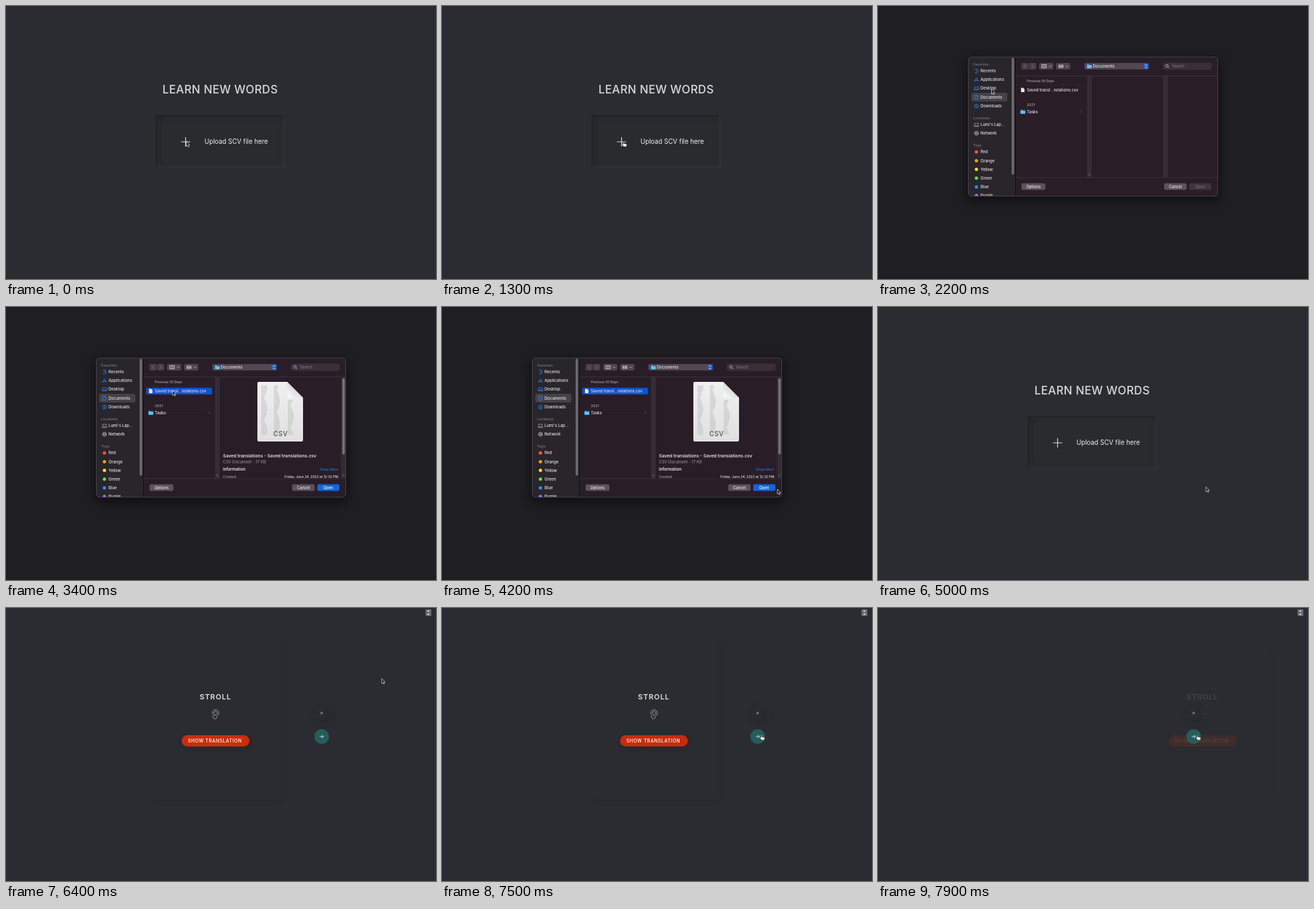
Write an HTML page that moves like this. It is 650 px wide and 412 px high and loops after 8 s.

```html
<!DOCTYPE html>
<html lang="en">
<head>
<meta charset="utf-8">
<title>Word trainer</title>
<style>
html, body { margin: 0; width: 100%; height: 100%; overflow: hidden; background: #2b2c31; }
svg { display: block; width: 100vw; height: 100vh; }
text { font-family: Inter, "Open Sans", sans-serif; }
</style>
</head>
<body>
<svg id="stage" viewBox="0 0 650 412" preserveAspectRatio="xMidYMid meet">
  <defs>
    <filter id="soft" x="-30%" y="-30%" width="160%" height="160%"><feGaussianBlur stdDeviation="3"/></filter>
    <filter id="wide" x="-30%" y="-30%" width="160%" height="160%"><feGaussianBlur stdDeviation="8"/></filter>
    <clipPath id="uploadClip"><rect x="226" y="164" width="197" height="81" rx="4"/></clipPath>
    <clipPath id="dialogClip"><rect x="136.5" y="77" width="377" height="210" rx="5"/></clipPath>
    <clipPath id="previewClip"><rect x="323" y="106" width="190" height="152.5"/></clipPath>
    <linearGradient id="paper" x2="0" y2="1"><stop stop-color="#f0f0f0"/><stop offset="1" stop-color="#e0e0e0"/></linearGradient>
    <linearGradient id="fold" x2="1" y1="1" y2="0"><stop stop-color="#fff"/><stop offset=".6" stop-color="#d4d4d4"/></linearGradient>
  </defs>
  <rect width="650" height="412" fill="#2b2c31"/>

  <g id="home">
    <g clip-path="url(#uploadClip)">
      <rect x="226" y="164" width="197" height="81" fill="#292b2f"/>
      <path d="M226 245V164H423" fill="none" stroke="#212327" stroke-width="7" filter="url(#soft)"/>
      <path d="M226 245H423V164" fill="none" stroke="#303136" stroke-width="5" filter="url(#soft)"/>
    </g>
    <text x="236.5" y="132" font-size="17" font-weight="500" letter-spacing=".35" fill="#d9d9da">LEARN NEW WORDS</text>
    <path d="M264.5 205H278.5M271.5 198V212" stroke="#dcdcdc" stroke-width="1.2"/>
    <text x="300" y="208" font-size="9.75" fill="#f0f0f0">Upload SCV file here</text>
  </g>

  <g id="trainer">
    <g id="card">
      <rect x="224" y="53" width="195" height="239" rx="8" fill="#25262a" opacity=".65" filter="url(#soft)"/>
      <rect x="218" y="46" width="198" height="243" rx="6" fill="#2b2c31"/>
      <text x="292.7" y="138" font-size="11" font-weight="600" letter-spacing=".9" fill="#e4e4e5">STROLL</text>
      <path d="M312.2 160C310.8 151.6 321.8 152 321.8 158.6C321.8 162 318.5 162.2 318.3 165.2C317.8 168.3 313.2 168 313 164.4L312.7 161.5M314.2 159.4C314 154.9 319.6 155 319.5 158.8C319.2 161 317.2 160.2 316.8 162.5M314.3 160.3C316.4 159.5 316.4 162 314.8 163" fill="none" stroke="#b9b9bb" stroke-width=".8"/>
      <rect x="266" y="194" width="102" height="17" rx="8.5" fill="#1b1b1e" opacity=".45" filter="url(#soft)"/>
      <rect x="265.5" y="192" width="102.5" height="17" rx="8.5" fill="#cb2d0b"/>
      <text x="275" y="203" font-size="6.9" font-weight="600" letter-spacing=".55" fill="#fbeae6">SHOW TRANSLATION</text>
    </g>
    <circle cx="480" cy="162" r="13" fill="#232529" opacity=".55" filter="url(#soft)"/>
    <circle cx="477" cy="158.5" r="10.5" fill="#2a2b30"/>
    <path d="M475.4 156.9l3.4 3.4m0-3.4l-3.4 3.4" stroke="#ccc" stroke-width=".8"/>
    <circle cx="477.2" cy="194" r="11" fill="#245e5b"/>
    <path d="M474.3 194h5.6m-2.4-2.4l2.4 2.4l-2.4 2.4" fill="none" stroke="#e6eeee" stroke-width=".9"/>
    <rect x="634" y="2" width="9" height="10" rx="1" fill="#66676b"/>
    <path d="M636 3.8h5l-2.5 2.5zM636 10.2h5l-2.5-2.5z" fill="#d8d8d8"/>
  </g>

  <rect id="shade" width="650" height="412" fill="#000"/>
  <g id="dialog"></g>
  <path id="arrow" d="M0 0V7.2L1.7 5.7L2.8 8.2L4 7.7L2.9 5.3H5.1Z" fill="#111" stroke="#eee" stroke-width=".7"/>
  <path id="hand" d="M1 0C1.8-.4 2.3.2 2.3 1V3.2C3 2.5 3.9 2.8 4 3.5C4.8 3 5.5 3.5 5.6 4C6.5 3.8 7 4.3 6.9 5.2L6.3 7.8H2.4L-.4 4.9C-.7 4 .3 3.7 1 4.5Z" fill="#f4f4f4" stroke="#222" stroke-width=".5"/>
</svg>
<script>
const LOOP = 8000;
const BLUE = '#2687f5';
const $ = id => document.getElementById(id);

const text = (x, y, s, size = 6, fill = '#e9e5e9', weight = 500, anchor = 'start') =>
  `<text x="${x}" y="${y}" font-size="${size}" fill="${fill}" font-weight="${weight}" text-anchor="${anchor}">${s}</text>`;
const rect = (x, y, w, h, fill, r = 0, more = '') =>
  `<rect x="${x}" y="${y}" width="${w}" height="${h}" rx="${r}" fill="${fill}" ${more}/>`;
const line = (d, stroke, width = .8) =>
  `<path d="${d}" fill="none" stroke="${stroke}" stroke-width="${width}"/>`;
const folder = (x, y) =>
  `<path d="M${x} ${y}h2.6l.8 .9h3.6v5h-7z" fill="#3cb3ee"/>` + rect(x, y + 1.8, 7, 4.1, '#55c6fa', .5);
const sheet = (x, y) => `<path d="M${x} ${y}h3.2l2 2v4.6h-5.2z" fill="#e8e8e8"/>`;

function sidebar() {
  const places = [
    ['Recents', 98, 'M146 96.5a3.1 3.1 0 1 1 0 3.2M148.8 96v2.2h1.5'],
    ['Applications', 111, 'M146 114l2.8-5.5l2.8 5.5M145.5 112.3h6.8'],
    ['Desktop', 124.3, 'M145.7 122h6.6v4.6h-6.6zM145.7 125.2h6.6'],
    ['Documents', 137.5, 'M146.6 134.5h2.8l1.8 1.8v4.4h-4.6zM149.2 134.6v1.9h2'],
    ['Downloads', 151, 'M145.8 151a3.1 3.1 0 1 0 6.2 0a3.1 3.1 0 1 0 -6.2 0M148.9 149v3.4m-1.3-1.2l1.3 1.3l1.3-1.3'],
    ["Lumi's Lap...", 179, 'M146 177h5.6v3.8h-5.6zM144.6 181.8h8.4'],
    ['Network', 192, 'M145.8 192a3.1 3.1 0 1 0 6.2 0a3.1 3.1 0 1 0 -6.2 0M146 192h5.8M148.9 189v6M147.3 190q-1 2 0 4m3.2-4q1 2 0 4']
  ];
  const tags = [['Red', '#ff5257'], ['Orange', '#ff9f0a'], ['Yellow', '#ffe014'], ['Green', '#5ce449'], ['Blue', '#2e8fff'], ['Purple', '#c566f5']];
  const heads = [['Favorites', 89.5], ['Locations', 170.5], ['Tags', 212]];
  return rect(136, 76, 71.5, 212, '#28262a') + rect(141, 131, 54.5, 13, '#454247', 2.5) +
    heads.map(([s, y]) => text(144, y, s, 5.3, '#747177', 600)).join('') +
    places.map(([s, y, d], i) => line(d, i < 5 ? BLUE : '#a5a3a7') + text(155, y + 2.1, s)).join('') +
    tags.map(([s, fill], i) => {
      const y = 220.3 + 13.15 * i;
      return `<circle cx="148.8" cy="${y}" r="2.5" fill="${fill}"/>` + text(155, y + 2.1, s);
    }).join('') +
    rect(202, 78, 3.8, 176.5, '#6b696d', 1.9) + rect(207, 76, .9, 212, '#121013');
}

function toolbar() {
  const button = '#51464f';
  return rect(217, 86, 10.7, 9.8, '#4a404a', 2) + rect(228.4, 86, 10.8, 9.8, '#4a404a', 2) +
    line('M223.3 88.6l-2 2.3l2 2.3M232.8 88.6l2 2.3l-2 2.3', '#817882') +
    rect(243.5, 86, 21.5, 9.8, button, 2) + rect(269.2, 86, 21.5, 9.8, button, 2) +
    line('M247.5 88.5h7v4.8h-7zM249.8 88.5v4.8M252.2 88.5v4.8M258.8 90.2l1.6 1.6l1.6-1.6M284 90.2l1.6 1.6l1.6-1.6', '#d4ced4') +
    line('M274 88.5v5M276.6 88.5v5M279.2 88.5v5', '#c8c2c8', 1.7) +
    rect(312, 86, 97.5, 9.8, '#534852', 2.3) + folder(316, 88) + text(324.5, 93, 'Documents', 6.05) +
    rect(401.6, 86.8, 7.2, 8.3, '#1d62d5', 2) + line('M403.7 90l1.5-1.6l1.5 1.6M403.7 92l1.5 1.6l1.5-1.6', '#fff') +
    rect(431, 86, 73, 9.8, '#3a2e37', 2.3, 'stroke="#493e47" stroke-width=".5"') +
    line('M434.8 90.3a2 2 0 1 0 4 0a2 2 0 1 0 -4 0M438.3 91.9l1.9 1.9', '#d0c8d0') +
    text(444, 93, 'Search', 5.8, '#8b818a', 400);
}

function preview() {
  let print = '';
  for (let y = 119; y < 193; y += 1.7) {
    for (let col = 0; col < 3; col++) {
      const x = [386, 405, 426][col];
      const w = 4 + 5 * Math.abs(Math.sin(y * 7.3 + col * 2.1));
      if (col < 2 || y > 140) print += `M${x} ${y.toFixed(1)}h${w.toFixed(1)}`;
    }
  }
  return `<g id="preview" clip-path="url(#previewClip)">` + rect(323, 106, 191, 153, '#291d27') +
    `<path d="M382 113H425L449 137V201Q449 203 447 203H382Q380 203 380 201V115Q380 113 382 113Z" fill="url(#paper)"/>` +
    line(print, '#bdbdbd', .75) +
    `<path d="M425 113L449 137H429Q425 137 425 133Z" fill="url(#fold)"/>` +
    `<text x="404" y="195.2" font-size="9.8" font-weight="600" letter-spacing=".5" fill="#666">CSV</text>` +
    text(328, 226.7, 'Saved translations - Saved translations.csv', 6.75, '#e6e1e6', 600) +
    text(328, 236, 'CSV Document - 17 KB', 6, '#a69da5', 400) +
    text(328, 247.4, 'Information', 6.1, '#f0edf0', 600) +
    text(502, 247.4, 'Show More', 5.2, BLUE, 400, 'end') +
    text(328, 258, 'Created', 5.2, '#aaa1a9', 500) +
    text(502, 258, 'Friday, June 24, 2022 at 12:32 PM', 5, '#eae5ea', 500, 'end') +
    rect(506.5, 106, 7, 153, '#352b34') + rect(508.3, 107.5, 3.8, 115, '#77707a', 1.9) +
    line('M509 252.5v3.5M511 252.5v3.5', '#766d75', .6) + '</g>';
}

function buildDialog() {
  const column = (x, w) => rect(x, 106, w, 153, '#352c34');
  $('dialog').innerHTML =
    rect(134, 80, 382, 215, '#000', 6, 'opacity=".5" filter="url(#wide)"') +
    '<g clip-path="url(#dialogClip)">' + rect(136, 76, 378, 212, '#291d27') + sidebar() + toolbar() +
    line('M208 105.5H514M208 259H514', '#40353e', .8) +
    text(225, 114.5, 'Previous 30 Days', 4.9, '#a59ca4', 600) +
    line('M208 119H316M208 154.7H316', '#352933', .6) +
    rect(212, 121.7, 99.5, 10.3, '#0a53cf', 2, 'id="selected"') +
    sheet(216.2, 123.5) + text(225, 129, 'Saved transl...nslations.csv', 5.95) +
    text(225, 150.8, '2021', 5.2, '#a59ca4', 600) +
    folder(215.5, 156.7) + text(225, 162, 'Tasks') + line('M306.5 158l1.5 1.7l-1.5 1.7', '#746a73') +
    column(316, 7) + line('M318.5 252.5v3.5M320.5 252.5v3.5', '#766d75', .6) +
    '<g id="emptyColumn">' + column(431, 7.5) + '</g>' + preview() +
    rect(217, 267.5, 36, 10, '#5d525b', 2.3) + text(235, 274.6, 'Options', 5.8, '#eee', 500, 'middle') +
    rect(432.5, 267.5, 34, 10, '#5d525b', 2.3) + text(449.5, 274.6, 'Cancel', 5.8, '#eee', 500, 'middle') +
    rect(470.5, 267.5, 33.5, 10, '#40353e', 2.3, 'id="openButton"') +
    '<g id="openLabel">' + text(487, 274.6, 'Open', 5.8, 'currentColor', 500, 'middle') + '</g></g>' +
    rect(136.5, 77, 377, 210, 'none', 5, 'stroke="#544d55" stroke-width=".8"');
}

const clamp = v => Math.max(0, Math.min(1, v));
const ease = p => (1 - Math.cos(Math.PI * p)) / 2;
const span = (t, a, b) => ease(clamp((t - a) / (b - a)));
const show = (id, on) => $(id).setAttribute('display', on ? 'inline' : 'none');

// Pointer path: time, x, y
const route = [
  [0, 272.5, 204.5], [1600, 272.5, 204.5], [2200, 171.5, 125.5], [2400, 171.5, 125.5],
  [3150, 252, 126], [3500, 252, 126], [3950, 529, 280], [4200, 507, 275],
  [4270, 507, 275], [4400, 495.8, 271.5], [5450, 495.8, 271.5], [6100, 567, 108],
  [6250, 567, 108], [6400, 568, 106.5], [6650, 568, 106.5], [7300, 481, 191.5], [LOOP, 481, 191.5]
];

function pointerAt(t) {
  const i = route.findIndex((stop, k) => k > 0 && t <= stop[0]);
  const [t0, x0, y0] = route[i - 1], [t1, x1, y1] = route[i];
  const p = span(t, t0, t1);
  return [x0 + (x1 - x0) * p, y0 + (y1 - y0) * p];
}

function draw(t) {
  const trainer = t >= 5200;
  show('home', !trainer);
  show('trainer', trainer);

  const leave = span(t, 7450, 8040);
  $('card').setAttribute('transform', `translate(${200 * leave} 0)`);
  $('card').setAttribute('opacity', span(t, 5150, 5550) * (1 - leave));

  const open = span(t, 1450, 1750) * (1 - span(t, 4580, 4800));
  const scale = .94 + .06 * open;
  $('shade').setAttribute('opacity', .29 * open);
  $('dialog').setAttribute('opacity', open);
  $('dialog').setAttribute('transform', `translate(325 182) scale(${scale}) translate(-325 -182)`);
  show('dialog', open > 0);

  const chosen = t >= 3400;
  show('selected', chosen);
  show('preview', chosen);
  show('emptyColumn', !chosen);
  $('openButton').setAttribute('fill', chosen ? '#1266dc' : '#40353e');
  $('openLabel').setAttribute('color', chosen ? '#fff' : '#766c75');

  const [x, y] = pointerAt(t);
  const onLink = (t >= 1000 && t < 1600) || t >= 7200;
  show('hand', onLink);
  show('arrow', !onLink);
  $(onLink ? 'hand' : 'arrow').setAttribute('transform', `translate(${x} ${y})`);
}

buildDialog();
const start = performance.now();
function tick() {
  draw((performance.now() - start) % LOOP);
  requestAnimationFrame(tick);
}
tick();
</script>
</body>
</html>
```
